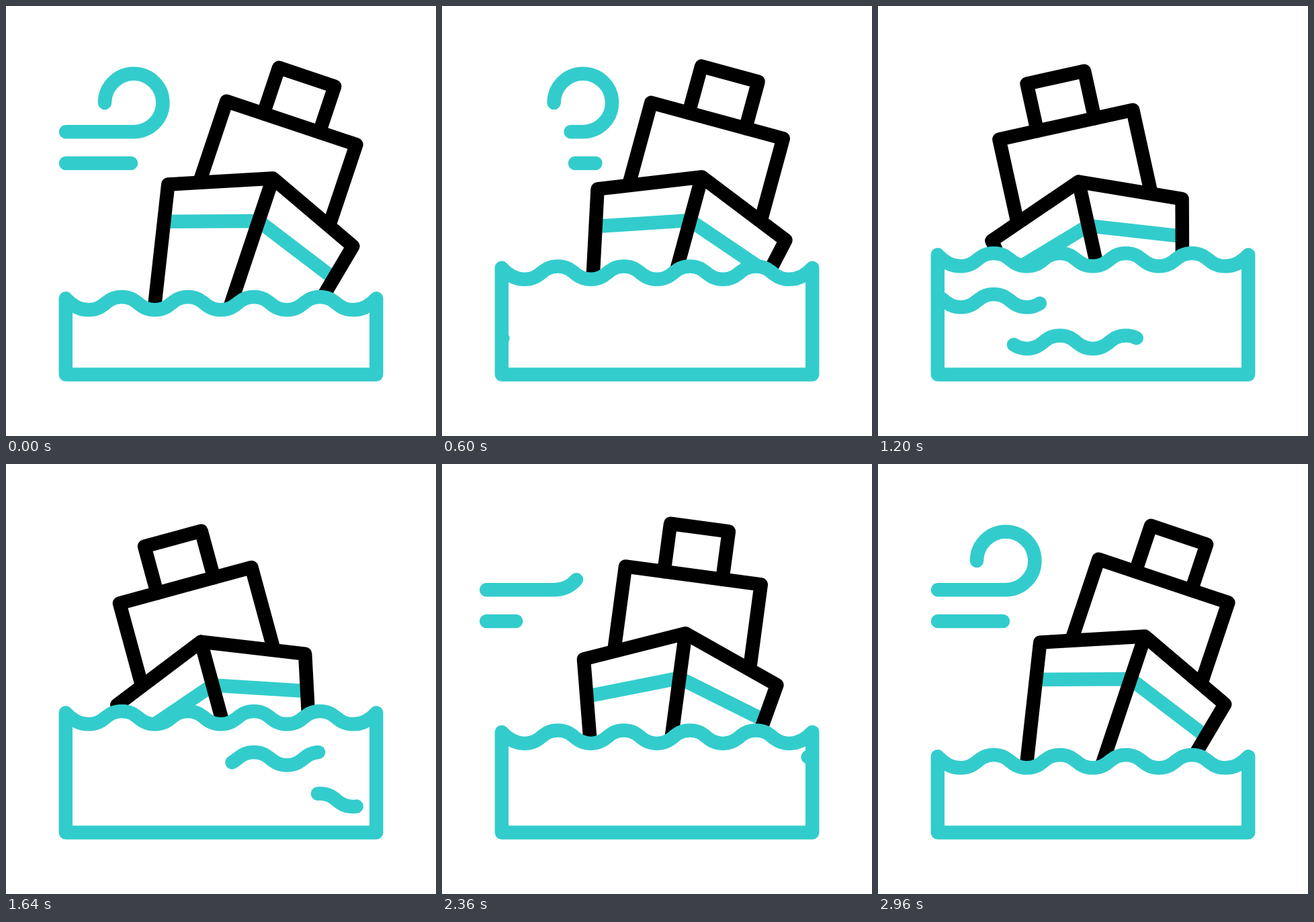
An HTML page that plays this animation: 640 px wide and 640 px high, repeating every 3 s.

```html
<!DOCTYPE html>
<html lang="en">
<head>
<meta charset="utf-8">
<title>Ship on rough water</title>
<style>
  html, body { margin: 0; width: 100%; height: 100%; overflow: hidden; background: #fff; }
  svg { display: block; width: 100vw; height: 100vh; }
  path { fill: none; stroke: #33cccc; stroke-width: 20.5; stroke-linecap: round; stroke-linejoin: round; }
  .hull { stroke: #000; }
  .stripe { stroke-linecap: butt; stroke-linejoin: miter; }
  #water { fill: #fff; }
</style>
</head>
<body>
<svg viewBox="0 0 640 640">
  <path id="gust" pathLength="1" d="M89 187.2H190.2A43.2 43.2 0 1 0 147 144"/>
  <path id="breeze" pathLength="1" d="M89 234H186"/>
  <g id="ship">
    <g transform="translate(397.2 256.5) rotate(18.5)">
      <path class="stripe" d="M-132 112L0 67L132 112"/>
      <path class="hull" d="M-43.8 -87V-159H43.8V-87"/>
      <path class="hull" d="M-101.8 38V-87H101.8V38"/>
      <path class="hull" d="M-103 253L-145 58L0 0L145 58L103 253M0 0V215"/>
    </g>
  </g>
  <path id="water"/>
  <path id="rippleA" pathLength="1"/>
  <path id="rippleB" pathLength="1"/>
</svg>
<script>
  const LOOP = 3000, STEP = 40;
  const HALF = 49.15, AMP = 9.7, FIRST = 123.2;
  const $ = id => document.getElementById(id);
  const clamp = v => Math.min(1, Math.max(0, v));

  // Cubic easing with handles (p, 0) and (q, 1)
  const ease = (p, q) => u => {
    let lo = 0, hi = 1;
    for (let i = 0; i < 22; i++) {
      const s = (lo + hi) / 2, r = 1 - s;
      if (3 * p * s * r * r + 3 * q * s * s * r + s ** 3 < u) lo = s; else hi = s;
    }
    return lo * lo * (3 - 2 * lo);
  };
  const soft = ease(.5, .5), firm = ease(.667, .333), glide = ease(.4, .2);
  const out = k => u => 1 - (1 - u) ** k;
  const span = (t, from, to, fn) => {
    const u = clamp((t - from) / (to - from));
    return u <= 0 ? 0 : u >= 1 ? 1 : fn(u);
  };

  // Eight half waves from the first trough to the last
  function waves(mid) {
    let d = '';
    for (let i = 0; i < 8; i++) {
      const x = FIRST + i * HALF, dir = i % 2 ? -1 : 1;
      const y0 = mid + AMP * dir, y1 = mid - AMP * dir;
      d += `C${x + HALF / 2} ${y0} ${x + HALF / 2} ${y1} ${x + HALF} ${y1}`;
    }
    return d;
  }

  function waterPath(mid) {
    const top = mid - 7.3, low = mid + AMP;
    return `M88.8 ${top}C98 ${mid + 3} 110 ${low} ${FIRST} ${low}` + waves(mid) +
      `C530 ${low} 542 ${mid + 3} 551.2 ${top}V548.5H88.8Z`;
  }

  function ripplePath(mid) {
    const low = mid + AMP;
    return `M89.4 ${mid - 6.2}C100.3 ${mid - .7} 105.1 ${low} ${FIRST} ${low}` + waves(mid) +
      `C534.9 ${low} 539.7 ${mid - .7} 550.6 ${mid - 6.2}`;
  }

  function trim(el, start, end) {
    const len = end - start;
    el.style.visibility = len > .0005 ? 'visible' : 'hidden';
    el.setAttribute('stroke-dasharray', `${Math.max(len, 0)} 3`);
    el.setAttribute('stroke-dashoffset', -start);
  }

  // Blows off to the right, then draws itself in again from the left
  function wind(el, t, from, to) {
    const back = t >= 2120;
    const x = back ? 55 * (span(t, 2120, 2960, out(2.6)) - 1)
                   : 53.4 * span(t, from, to, soft);
    el.setAttribute('transform', `translate(${x} 0)`);
    if (back) trim(el, 0, span(t, 2120, 2960, out(1.8)));
    else trim(el, span(t, from + 40, to + 40, soft), 1);
  }

  function draw(t) {
    const tilt = 33.7 * (span(t, 1675, 2890, firm) - span(t, 205, 1570, firm));
    $('ship').setAttribute('transform', `rotate(${tilt} 357 437.5)`);

    const rise = 65 * (span(t, 80, 940, soft) - span(t, 1886, 2874, firm));
    $('water').setAttribute('d', waterPath(442.6 - rise));

    wind($('gust'), t, 280, 1020);
    wind($('breeze'), t, 220, 790);
    trim($('rippleA'), span(t, 1098, 2588, glide), span(t, 693, 2469, glide));
    trim($('rippleB'), span(t, 796, 2385, glide), span(t, 552, 2124, glide));
  }

  $('rippleA').setAttribute('d', ripplePath(438.6));
  $('rippleB').setAttribute('d', ripplePath(500.2));

  let origin;
  function tick(now) {
    origin ??= now;
    const t = (now - origin) % LOOP;
    draw(Math.floor(t / STEP) * STEP);
    requestAnimationFrame(tick);
  }
  draw(0);
  requestAnimationFrame(tick);
</script>
</body>
</html>
```
